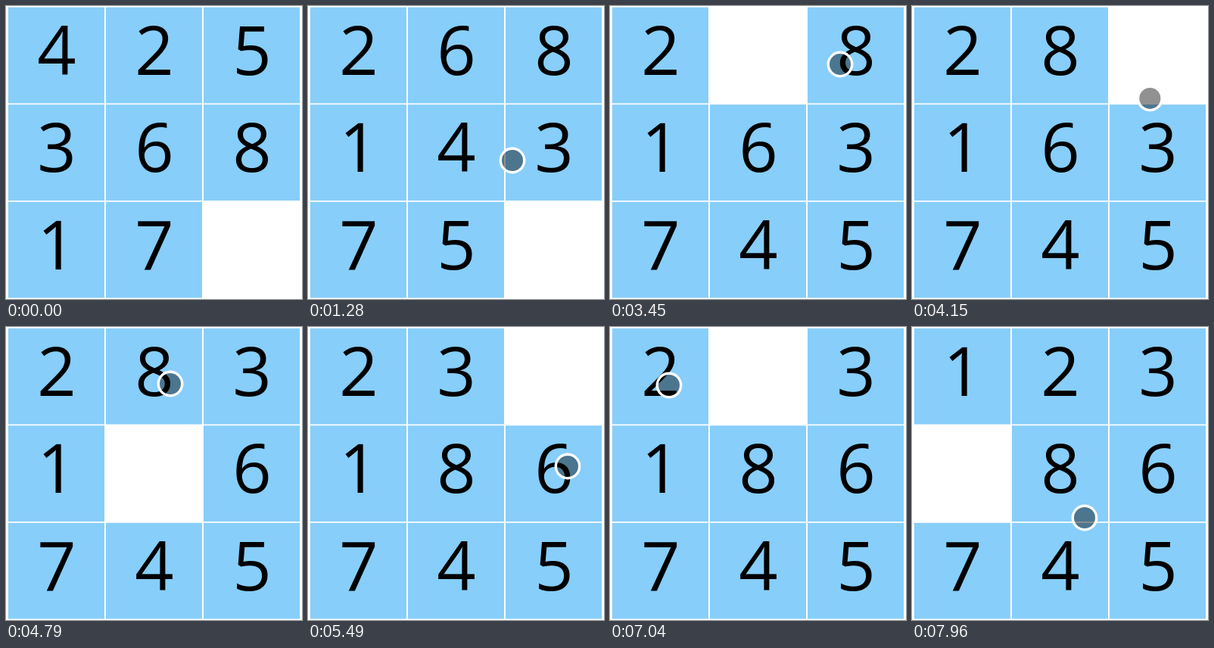
Recreate the animation shown at these times as an HTML page. Size 391 px wide and 387 px high, loop 8 s.

```html
<!DOCTYPE html>
<html lang="en">
<head>
<meta charset="utf-8">
<title>Sliding puzzle</title>
<style>
html, body { margin: 0; width: 100%; height: 100%; overflow: hidden; background: #fff; }
svg { display: block; width: 100%; height: 100%; }
text { font: 90px "Open Sans", "Noto Sans", sans-serif; text-anchor: middle; }
</style>
</head>
<body>
<svg id="stage" viewBox="0 0 391 387"></svg>
<script>
const LOOP = 8000, SHUFFLE = 650, ENTER = 820;
const SPEED = 0.65; // pointer, px per ms

// Boards read row by row; 0 is the gap.
const START = "425368170", SHUFFLED = "268143750";

// Where the pointer rests, when it leaves, and the tile it clicks on leaving.
const stop = (leave, x, y, tile) => ({ leave, x, y, tile });
const STOPS = [
  stop(ENTER, 340, 334),
  stop(1600, 270, 204),
  stop(2360, 208, 190),
  stop(2670, 202, 286, "5"),
  stop(2980, 202, 182, "4"),
  stop(3300, 208, 60, "6"),
  stop(4080, 304, 77, "8"),
  stop(4320, 330, 190, "3"),
  stop(4550, 212, 190, "6"),
  stop(4865, 217, 75, "8"),
  stop(5170, 315, 75, "3"),
  stop(5570, 343, 184),
  stop(6100, 205, 70, "3"),
  stop(6350, 88, 70),
  stop(6650, 68, 183),
  stop(7190, 78, 77, "2"),
  stop(7570, 70, 177, "1"),
  stop(LOOP, 228, 252)
];

const stage = document.getElementById("stage");

function add(parent, tag, attrs) {
  const el = document.createElementNS("http://www.w3.org/2000/svg", tag);
  for (const k in attrs) el.setAttribute(k, attrs[k]);
  return parent.appendChild(el);
}

const cells = [...START].map((_, i) => {
  const x = 3 + 129 * (i % 3), y = 1.7 + 128.5 * Math.floor(i / 3);
  const g = add(stage, "g", {});
  add(g, "rect", { x, y, width: 127, height: 126.8, fill: "#87cefa" });
  const label = add(g, "text", { x: x + 64, y: Math.round(y) + 89 });
  return { g, label };
});

const pointer = add(stage, "circle", {
  r: 15.7, fill: "#000", "fill-opacity": 0.43, stroke: "#fff", "stroke-width": 3.4
});

function boardAt(t) {
  if (t < SHUFFLE) return [...START];
  const board = [...SHUFFLED];
  for (const { leave, tile } of STOPS) {
    if (!tile || t < leave) continue;
    const from = board.indexOf(tile), gap = board.indexOf("0");
    board[gap] = tile;
    board[from] = "0";
  }
  return board;
}

function pointerAt(t) {
  const i = STOPS.findIndex(s => s.leave > t);
  if (i < 1) return null;
  const a = STOPS[i - 1], b = STOPS[i];
  const dx = b.x - a.x, dy = b.y - a.y;
  const k = Math.min(1, (t - a.leave) * SPEED / Math.hypot(dx, dy));
  return [a.x + dx * k, a.y + dy * k];
}

function draw(t) {
  boardAt(t).forEach((n, i) => {
    const { g, label } = cells[i];
    g.style.display = n === "0" ? "none" : "";
    if (label.textContent !== n) label.textContent = n;
  });
  const p = pointerAt(t);
  pointer.style.display = p ? "" : "none";
  if (p) pointer.setAttribute("transform", `translate(${p})`);
}

const begin = performance.now();
function tick() {
  draw((performance.now() - begin) % LOOP);
  requestAnimationFrame(tick);
}
tick();
</script>
</body>
</html>
```
